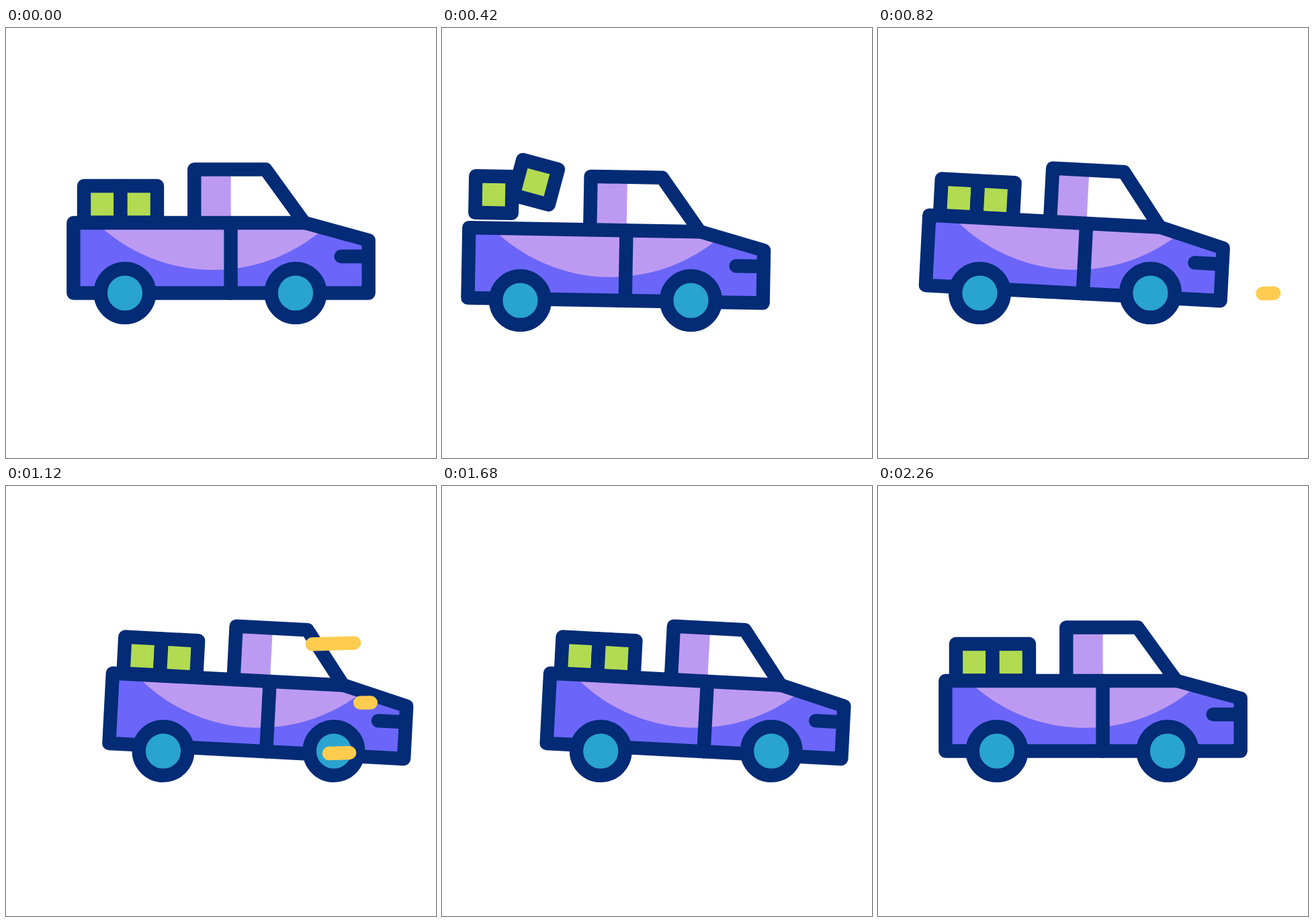
Animation of 640x640 px, one loop 3600 ms. Source, as an HTML page:

```html
<!DOCTYPE html>
<html lang="en">
<head>
<meta charset="utf-8">
<title>Pickup truck</title>
<style>
  html, body { margin: 0; width: 100%; height: 100%; overflow: hidden; background: #fff; }
  svg { display: block; width: 100vw; height: 100vh; }
  .line { fill: none; stroke: #032b76; stroke-width: 20.4; stroke-linecap: round; stroke-linejoin: round; }
  .box { fill: #b2db51; }
  .wheel { fill: #29a3cf; }
  .streak { stroke: #ffcc4f; }
</style>
</head>
<body>
<svg viewBox="0 0 640 640">
  <defs>
    <path id="shell" d="M100.4 290H445L539.7 316V394.5H100.4Z"/>
    <clipPath id="inside"><use href="#shell"/></clipPath>
  </defs>
  <g id="truck">
    <g id="body">
      <rect id="boxL" class="line box" x="116" y="235" width="54.5" height="54.5"/>
      <rect id="boxR" class="line box" x="170.5" y="235" width="54.5" height="54.5"/>
      <path fill="#bd9af2" d="M285 215H334.7V285H285Z"/>
      <use href="#shell" fill="#6b66f9"/>
      <circle cx="308.5" cy="109" r="251" fill="#bd9af2" clip-path="url(#inside)"/>
      <path class="line" d="M280.3 290V210.5H386.4L444 290"/>
      <path class="line" d="M334.6 290V394.5M498.7 340H539"/>
      <use href="#shell" class="line"/>
    </g>
    <circle class="line wheel" cx="177" cy="394.5" r="36.3"/>
    <circle class="line wheel" cx="431" cy="394.5" r="36.3"/>
  </g>
  <g id="streaks"></g>
</svg>
<script>
const LOOP = 3600, STEP = 20;
const $ = id => document.getElementById(id);

// time, offset, speed
const DRIVE = [
  [0, 0, 0], [270, -71, 0], [420, -60.5, .074], [540, -51.5, .078],
  [820, -25.5, .17], [1080, 45.5, .29], [1120, 57, .27],
  [1300, 74.7, 0], [1440, 74.7, 0], [2260, 0, 0]
];

const STREAKS = [
  { start: 840, y: 231, slope: -.03, speed: .4214, len: 62.5 },
  { start: 945, y: 321.8, slope: -.01, speed: .4, len: 19 },
  { start: 735, y: 394.3, slope: -.03, speed: .283, len: 36.5 }
];
const STREAK_TIME = 560, STREAK_X = 605;

for (const s of STREAKS) {
  s.el = document.createElementNS("http://www.w3.org/2000/svg", "line");
  s.el.setAttribute("class", "line streak");
  $("streaks").append(s.el);
}

function ease(t, from, to) {
  const p = Math.min(1, Math.max(0, (t - from) / (to - from)));
  return p * p * (3 - 2 * p);
}

function drive(t) {
  const i = DRIVE.findIndex(k => k[0] > t);
  if (i < 0) return 0;
  const [t0, x0, v0] = DRIVE[i - 1], [t1, x1, v1] = DRIVE[i];
  const d = t1 - t0, p = (t - t0) / d, q = 1 - p;
  return q * q * (1 + 2 * p) * x0 + p * p * (3 - 2 * p) * x1
       + p * q * d * (q * v0 - p * v1);
}

function move(id, x, y, turn, cx, cy) {
  $(id).setAttribute("transform", `translate(${x} ${y}) rotate(${turn} ${cx} ${cy})`);
}

function drawStreak(s, t) {
  const p = (t - s.start) / STREAK_TIME;
  const on = p > 0 && p < 1;
  s.el.style.display = on ? "" : "none";
  if (!on) return;
  const mid = STREAK_X - s.speed * (t - s.start);
  const half = s.len * Math.sin(Math.PI * p) / 2;
  [mid - half, mid + half].forEach((x, i) => {
    s.el.setAttribute("x" + (i + 1), x);
    s.el.setAttribute("y" + (i + 1), s.y + s.slope * (x - STREAK_X));
  });
}

function draw(t) {
  const jolt = ease(t, 312, 500) - ease(t, 500, 690);
  const tilt = 3 * (ease(t, 330, 560) - ease(t, 1860, 2260));
  move("truck", drive(t), 18 * jolt, 0, 0, 0);
  move("body", 0, 0, tilt, 318, 312);
  move("boxL", -11.5 * jolt, -36 * jolt, 0, 0, 0);
  move("boxR", jolt, -68 * jolt, 23 * jolt, 197.75, 262.25);
  STREAKS.forEach(s => drawStreak(s, t));
}

const begin = performance.now();
function tick() {
  const t = (performance.now() - begin) % LOOP;
  draw(Math.floor(t / STEP) * STEP);
  requestAnimationFrame(tick);
}
tick();
</script>
</body>
</html>
```
